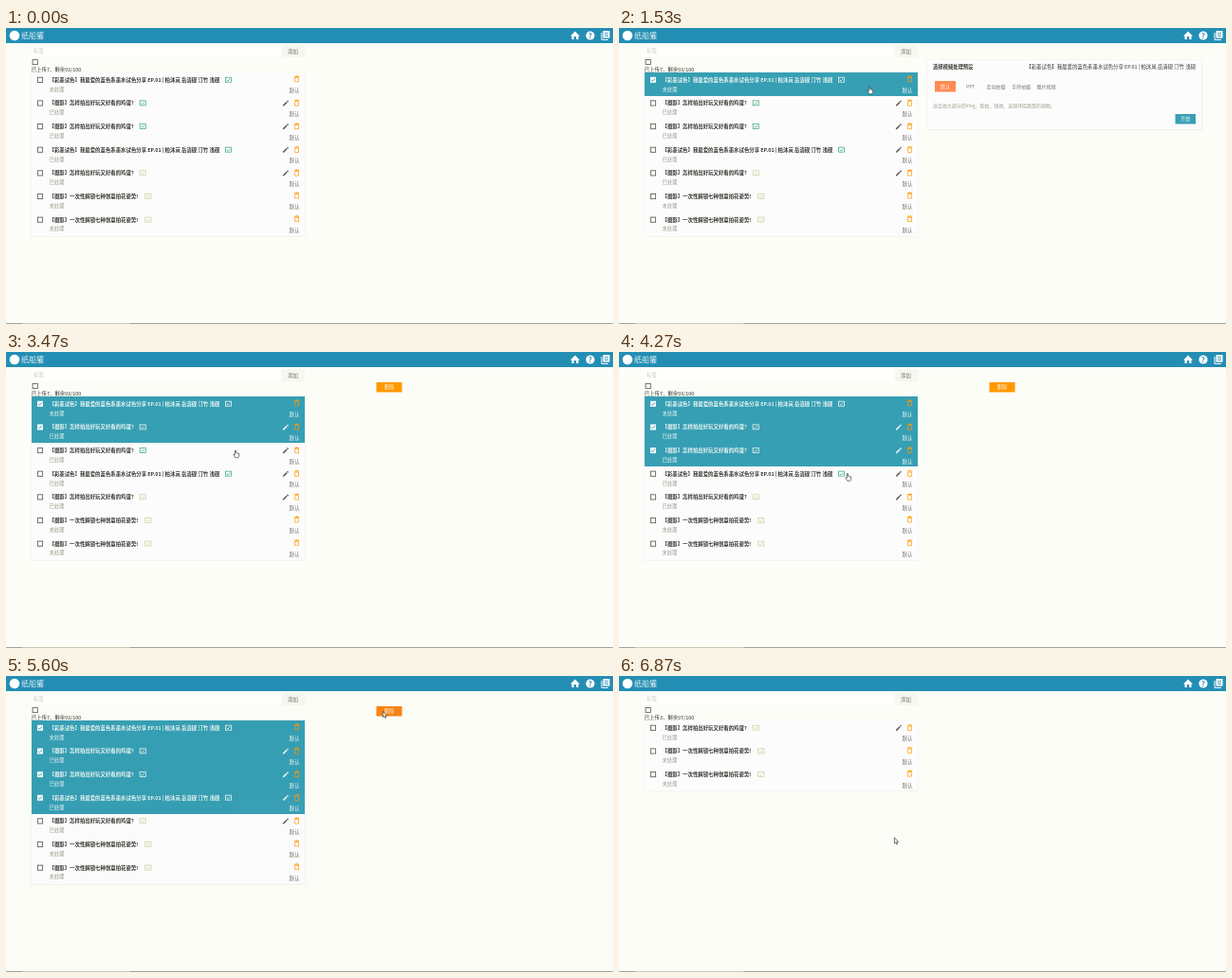
Animation, 640 px wide and 313 px high, one loop 6990 ms. Source, as an HTML page with a canvas:

```html
<!DOCTYPE html>
<html lang="zh-CN">
<head>
<meta charset="utf-8">
<style>
html, body { margin: 0; width: 100%; height: 100%; overflow: hidden; background: #fdfdf8; }
canvas { display: block; width: 640px; height: 313px; }
</style>
</head>
<body>
<canvas id="stage" width="640" height="313"></canvas>
<script>
const ctx = document.getElementById('stage').getContext('2d');
const LOOP = 6990;
const TOP = 47, PITCH = 24.65;
const FONT = '"Noto Sans CJK SC", "Noto Sans CJK", "Noto Sans", sans-serif';
const C = {
  page: '#fdfdf8', card: '#fdfcfd', edge: '#f0f0ea', header: '#238eb4', accent: '#369fb4',
  ink: '#34332c', dim: '#77756a', muted: '#9c9a88', faint: '#c8c7b4', light: '#eef6f2',
  orange: '#ff9800', pressed: '#fa8412', green: '#45b07c', olive: '#d2d0a4', white: '#ffffff'
};

const INK_TITLE = '【彩墨试色】我最爱的蓝色系墨水试色分享 EP.01 | 柏沐岚 岳清砚 汀竹 浅砚';
const EGG_TITLE = '【摄影】怎样拍出好玩又好看的鸡蛋?';
const FLOWER_TITLE = '【摄影】一次性解锁七种创意拍花姿势!';
const row = (title, done, icon, iconX) => ({ title, done, icon, iconX });
const rows = [
  row(INK_TITLE, false, C.green, 231),
  row(EGG_TITLE, true, C.green, 140.7),
  row(EGG_TITLE, true, C.green, 140.7),
  row(INK_TITLE, true, C.green, 231),
  row(EGG_TITLE, true, C.olive, 140.7),
  row(FLOWER_TITLE, false, C.olive, 146.3),
  row(FLOWER_TITLE, false, C.olive, 146.3)
];

const selectAt = [930, 1980, 3470, 4330];
const SELECT_TIME = 200;
const PANEL_IN = 1130, PANEL_OUT = 2050, PRESS = 5470;
const DIALOG_IN = 5600, DIALOG_OUT = 6760, REMOVED = 6830;

// time, x, y: the pointer eases between neighbouring stops
const stops = [
  [70, 547, 203], [730, 265, 66], [1550, 265, 66], [1930, 254, 86],
  [2450, 254, 86], [3270, 243, 108], [3800, 243, 108], [4000, 242, 132.5],
  [4600, 242, 132.5], [5330, 399, 41], [5750, 399, 41], [6400, 292, 174.5]
];

const clamp = v => Math.max(0, Math.min(1, v));
const ramp = (t, start, length) => clamp((t - start) / length);
const ease = v => v * v * (3 - 2 * v);

function box(x, y, w, h, fill) {
  ctx.fillStyle = fill;
  ctx.fillRect(x, y, w, h);
}

function stroke(points, color, width = 0.8, closed = false) {
  ctx.beginPath();
  points.forEach(([x, y]) => ctx.lineTo(x, y));
  if (closed) ctx.closePath();
  ctx.strokeStyle = color;
  ctx.lineWidth = width;
  ctx.stroke();
}

function outline(x, y, w, h, color, width) {
  ctx.strokeStyle = color;
  ctx.lineWidth = width;
  ctx.strokeRect(x, y, w, h);
}

function polygon(points, fill) {
  ctx.beginPath();
  points.forEach(([x, y]) => ctx.lineTo(x, y));
  ctx.fillStyle = fill;
  ctx.fill();
}

function disc(x, y, r, fill) {
  ctx.beginPath();
  ctx.arc(x, y, r, 0, 7);
  ctx.fillStyle = fill;
  ctx.fill();
}

// Drawn through a scale so that small sizes keep their exact metrics.
function text(str, x, y, size, color, { align = 'left', weight = 400 } = {}) {
  ctx.save();
  ctx.translate(x, y + size * 0.37);
  ctx.scale(0.25, 0.25);
  ctx.font = `${weight} ${size * 4}px ${FONT}`;
  ctx.textAlign = align;
  ctx.fillStyle = color;
  ctx.fillText(str, 0, 0);
  ctx.restore();
}

function faded(alpha, draw) {
  if (alpha <= 0) return;
  ctx.save();
  ctx.globalAlpha *= alpha;
  draw();
  ctx.restore();
}

function button(x, y, w, h, label, fill, color = '#fff4e4') {
  box(x, y, w, h, fill);
  text(label, x + w / 2, y + h / 2, 5.2, color, { align: 'center' });
}

function checkbox(x, y, checked) {
  if (checked) {
    box(x - 3, y - 3, 6, 6, C.white);
    stroke([[x - 2, y], [x - 0.6, y + 1.5], [x + 2.1, y - 1.5]], C.accent, 1);
  } else {
    outline(x - 2.6, y - 2.6, 5.2, 5.2, '#66645c', 0.9);
  }
}

function thumbIcon(x, y, color) {
  outline(x + 0.4, y - 2.6, 6.2, 5, color, 0.8);
  stroke([[x + 1.7, y + 0.1], [x + 3, y + 1.1], [x + 5.3, y - 1.1]], color, 0.8);
}

function pencil(x, y, color) {
  stroke([[x - 2.5, y + 2.5], [x + 1.4, y - 1.4]], color, 1.6);
  stroke([[x + 1.8, y - 1.8], [x + 2.8, y - 2.8]], color, 1.6);
}

function trash(x, y) {
  box(x - 2.5, y - 3.2, 5, 0.8, C.orange);
  box(x - 1, y - 3.8, 2, 0.6, C.orange);
  outline(x - 1.9, y - 1.7, 3.8, 4.4, C.orange, 0.7);
}

function drawHeader() {
  box(0, 0, 640, 16, C.header);
  disc(9, 8, 5.3, C.white);
  text('纸船獾', 16, 8, 8, '#e6f2f4');
  polygon([[595, 8.4], [600, 3.6], [605, 8.4], [603.5, 8.4], [603.5, 12], [601.2, 12],
    [601.2, 9], [598.8, 9], [598.8, 12], [596.5, 12], [596.5, 8.4]], C.white);
  disc(616, 8, 4.6, C.white);
  text('?', 616, 8, 7.5, C.header, { align: 'center', weight: 700 });
  stroke([[628, 5], [628, 12.4], [635, 12.4]], C.white, 1);
  box(629.5, 3, 7, 7.6, C.white);
  [4.8, 6.6, 8.4].forEach(y => box(631, y, 4, 0.7, C.header));
}

function drawRow(item, index, picked) {
  const y = TOP + PITCH * index, mid = y + 7.8;
  const edge = Math.round(y), height = Math.round(y + PITCH) - edge;
  const paint = on => {
    if (on) box(27, edge, 288, height, C.accent);
    checkbox(36, mid, on);
    text(item.title, 45.5, mid, 5.4, on ? C.light : C.ink, { weight: 700 });
    thumbIcon(item.iconX, mid, on ? C.light : item.icon);
    text(item.done ? '已处理' : '未处理', 45.5, y + 17.6, 5.3, on ? C.light : C.muted);
    if (item.done) pencil(294.7, mid + 0.3, on ? C.light : '#5f5d52');
    trash(306.6, mid - (item.done ? 0 : 0.7));
    text('默认', 309.5, y + 19.2, 5.5, on ? C.light : C.dim, { align: 'right' });
  };
  if (picked < 1) paint(false);
  faded(picked, () => paint(true));
}

function drawList(t) {
  const removed = t >= REMOVED;
  const shown = removed ? rows.slice(4) : rows;
  box(27, 18, 262, 13, '#fffffd');
  text('标签', 29, 24.5, 5.4, C.faint);
  box(291, 18, 24, 13, '#f7f7f2');
  text('添加', 302.5, 24.5, 5.5, C.dim, { align: 'center' });
  checkbox(30.7, 36, false);
  text(removed ? '已上传3，剩余97/100' : '已上传7，剩余93/100', 26.7, 44, 5.4, C.ink);
  const height = Math.round(PITCH * shown.length);
  box(26.5, TOP - 0.5, 289, height + 1.2, C.edge);
  box(27, TOP, 288, height, C.card);
  shown.forEach((item, i) => {
    const picked = !removed && i < selectAt.length ? ramp(t, selectAt[i], SELECT_TIME) : 0;
    drawRow(item, i, picked);
  });
}

function drawPanel() {
  box(324.5, 33.5, 290.5, 74.5, C.edge);
  box(325, 34, 289, 73, C.card);
  text('选择视频处理预设', 331, 41.3, 5.3, C.ink, { weight: 700 });
  text(INK_TITLE, 608, 41.3, 5.4, C.ink, { align: 'right' });
  button(333, 56, 22, 11.5, '默认', '#ff8a50');
  [['PPT', 366], ['走动拍摄', 387.5], ['手持拍摄', 414], ['图片视频', 440.5]]
    .forEach(([label, x]) => text(label, x, 62, 5, C.dim));
  text('适合绝大部分的Vlog、街拍、短视、运镜环绕类型的视频。', 331, 82.5, 4.95, C.muted);
  button(586.5, 91, 21.5, 10.5, '开始', C.accent, C.light);
}

function drawDialog(t) {
  box(0, 0, 640, 313, 'rgba(4, 4, 0, .37)');
  box(245, 124, 150, 65, C.white);
  text('确定要删除吗?', 319.5, 139.5, 5.4, C.ink, { align: 'center' });
  button(269, 166, 27, 11, '删除', t >= 6400 ? C.pressed : C.orange);
  button(344, 166, 27, 11, '取消', '#f8f8f0', C.dim);
}

function pointerAt(t) {
  let [, x, y] = stops[0];
  for (let i = 1; i < stops.length; i++) {
    const [t0, x0, y0] = stops[i - 1], [t1, x1, y1] = stops[i];
    if (t < t0) break;
    const k = ease(ramp(t, t0, t1 - t0));
    x = x0 + (x1 - x0) * k;
    y = y0 + (y1 - y0) * k;
  }
  return [x, y];
}

function isOverControl(t, x, y) {
  const inside = (left, top, right, bottom) => x > left && x < right && y > top && y < bottom;
  if (t >= REMOVED) return false;
  if (t >= DIALOG_IN) return inside(269, 166, 296, 177);
  return inside(27, TOP, 315, 219) || t > PANEL_OUT && inside(390, 32, 418, 43);
}

function drawPointer(t) {
  if (t < stops[0][0]) return;
  const [x, y] = pointerAt(t);
  const shape = isOverControl(t, x, y)
    ? [[-1.6, -3.8], [-0.4, -3.8], [-0.2, -1.2], [2.8, -0.4], [2.6, 2.4], [1.6, 3.8],
      [-1.2, 3.8], [-3, 1], [-2.6, 0], [-1.6, 0.8]]
    : [[-1.6, -3.8], [-1.6, 2.6], [-0.2, 1.4], [0.8, 3.6], [1.6, 3.2], [0.7, 1.1], [2.5, 1]];
  const points = shape.map(([dx, dy]) => [x + dx, y + dy]);
  polygon(points, C.white);
  stroke(points, '#3e3e3a', 0.7, true);
}

function draw(t) {
  box(0, 0, 640, 313, C.page);
  drawHeader();
  drawList(t);
  box(0, 312, 640, 1, '#a3a39d');
  box(17, 312, 114, 1, '#c9c9b4');
  if (t < PANEL_OUT) faded(ramp(t, PANEL_IN, 130), drawPanel);
  if (t >= PANEL_OUT && t < REMOVED) {
    button(390.5, 32, 27, 10.5, '删除', t >= PRESS ? C.pressed : C.orange);
  }
  const dialog = Math.min(ramp(t, DIALOG_IN, 150), 1 - ramp(t, DIALOG_OUT, 75));
  faded(dialog, () => drawDialog(t));
  drawPointer(t);
}

const start = performance.now();
function frame() {
  draw((performance.now() - start) % LOOP);
  requestAnimationFrame(frame);
}
frame();
</script>
</body>
</html>
```
